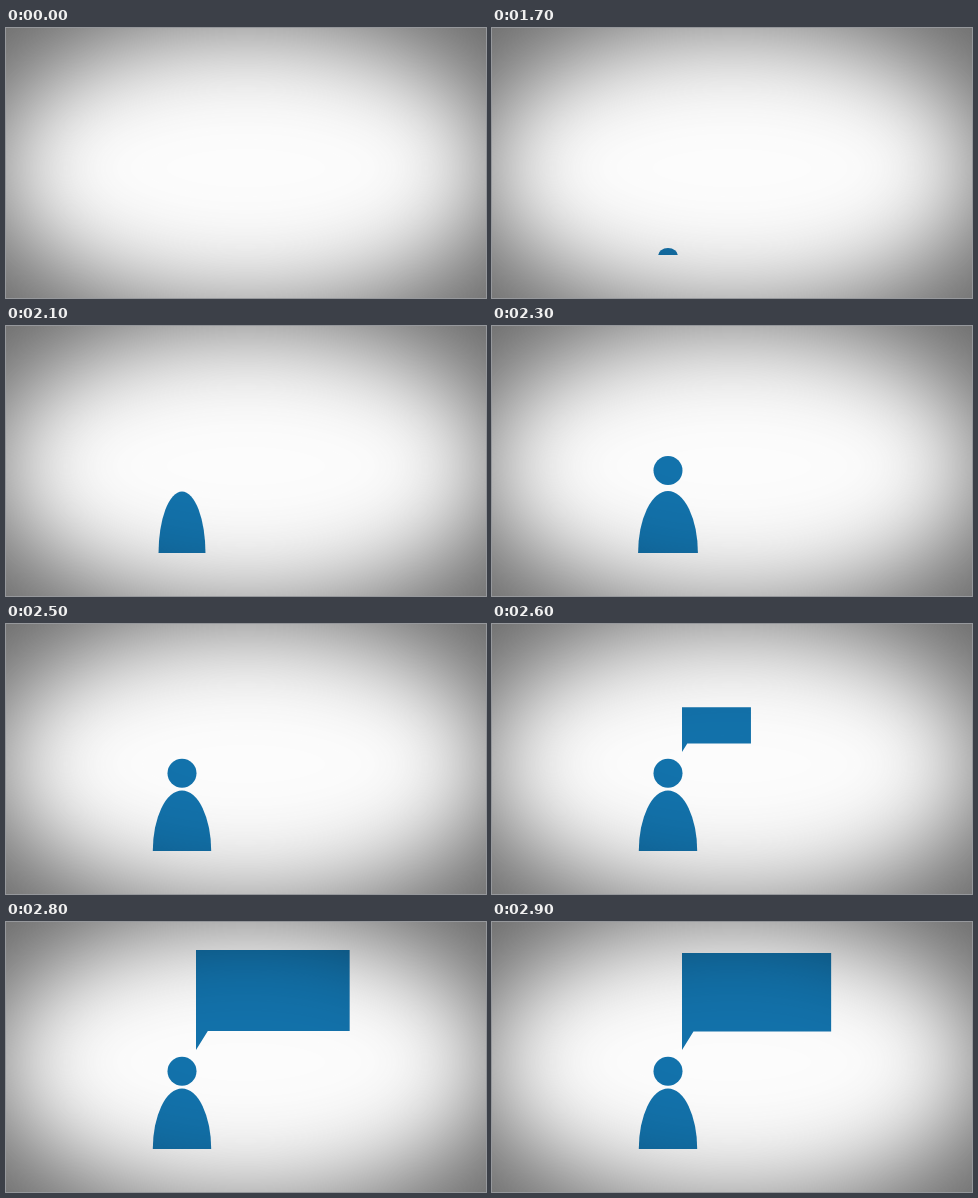
These frames come from a looping animation (480 by 270 pixels, 3 s). An HTML page:

```html
<!DOCTYPE html>
<html lang="en">
<head>
<meta charset="utf-8">
<title>Speaking figure</title>
<style>
html, body { margin: 0; width: 100%; height: 100%; overflow: hidden; background: #6b6b6b; }
svg { display: block; width: 100vw; height: 100vh; }
#vignette { mix-blend-mode: multiply; }
</style>
</head>
<body>
<svg viewBox="0 0 480 270" preserveAspectRatio="none">
  <defs>
    <filter id="soft" filterUnits="userSpaceOnUse" x="-200" y="-200" width="880" height="670" color-interpolation-filters="sRGB">
      <feGaussianBlur stdDeviation="50"/>
    </filter>
  </defs>
  <rect width="480" height="270" fill="#fff"/>
  <g fill="#1273ad">
    <path id="body"/>
    <circle id="head" cx="176" r="14.5"/>
    <path id="bubble" d="M0 0V-96.4H148.2V-18.4H11.4Z"/>
  </g>
  <g id="vignette">
    <rect width="480" height="270" fill="#6b6b6b"/>
    <ellipse cx="240" cy="140" rx="254" ry="142" fill="#fcfcfc" filter="url(#soft)"/>
  </g>
</svg>
<script>
const LOOP = 3000, STEP = 100;
const MID = 176, FLOOR = 227;
const [body, head, bubble] = ['body', 'head', 'bubble'].map(id => document.getElementById(id));

// Goes from 0 to 1, overshooting on the way; a larger bounce overshoots more.
function pop(t, start, length, bounce = 1) {
  const u = Math.min(Math.max((t - start) / length, 0), 1) - 1;
  return 1 + (bounce + 1) * u ** 3 + bounce * u ** 2;
}

function show(el, on) {
  el.setAttribute('visibility', on ? 'visible' : 'hidden');
}

function draw(t) {
  const rise = pop(t, 1677, 780);
  const widen = pop(t, 2000, 450);
  const lift = pop(t, 2100, 360, 2);
  const speak = pop(t, 2546, 388);

  const h = 60.5 * rise;
  const w = 9.5 + 2.5 * rise + 17.2 * widen;
  body.setAttribute('d', `M${MID - w} ${FLOOR}A${w} ${h} 0 0 1 ${MID + w} ${FLOOR}Z`);
  head.setAttribute('cy', 186 - 36.7 * lift);
  bubble.setAttribute('transform', `translate(190 128) scale(${speak})`);

  show(body, rise > 0);
  show(head, lift > 0);
  show(bubble, speak > 0);
}

const start = performance.now();
function tick() {
  const t = (performance.now() - start) % LOOP;
  draw(Math.floor(t / STEP) * STEP);
  requestAnimationFrame(tick);
}
tick();
</script>
</body>
</html>
```
